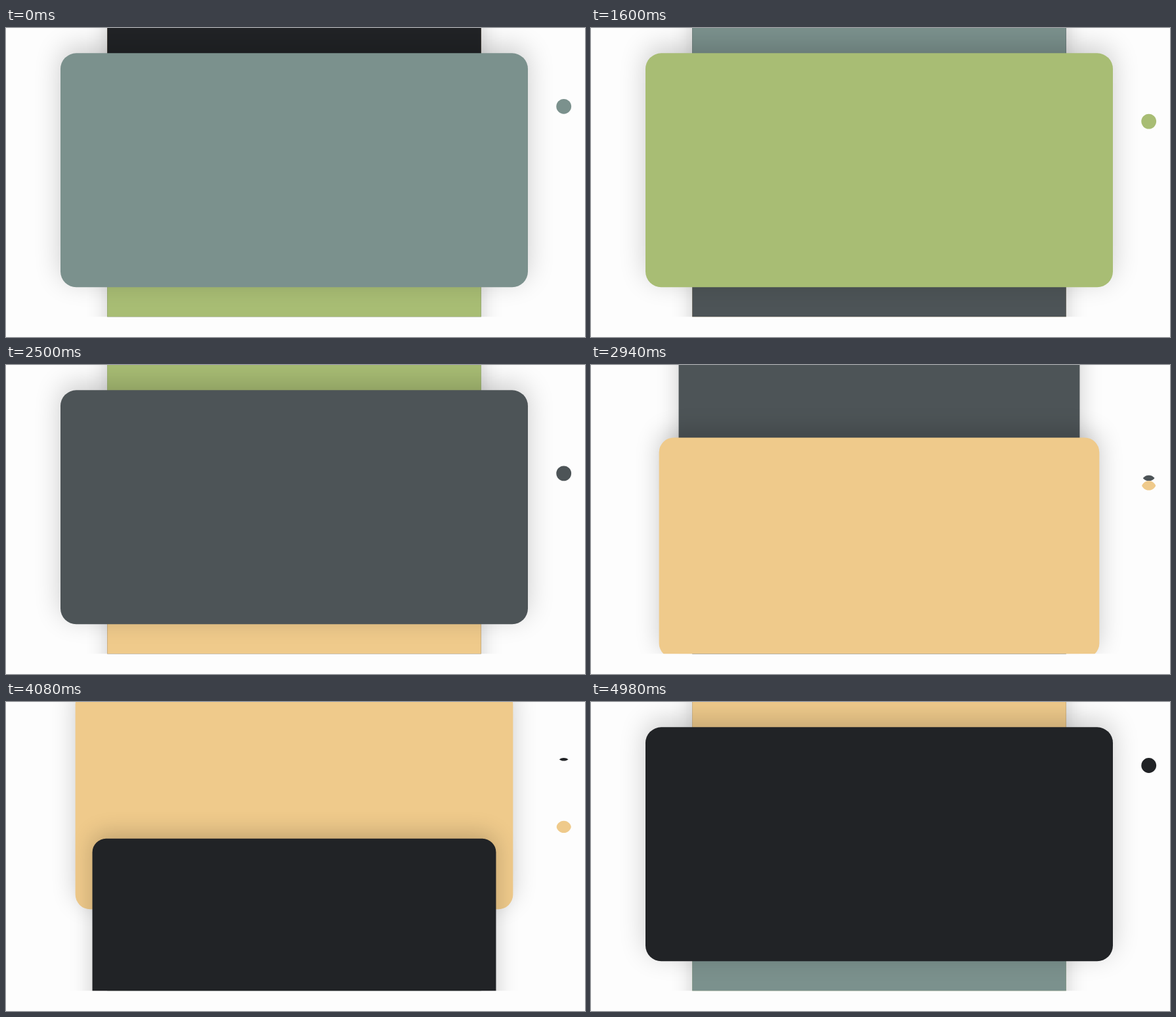
Write an HTML page with a canvas that moves like this. It is 882x470 px and loops after 5000 ms.

```html
<!DOCTYPE html>
<html lang="en">
<head>
<meta charset="utf-8">
<title>Vertical card carousel</title>
<style>
  html, body { margin: 0; width: 100%; height: 100%; overflow: hidden; background: #fdfdfd; }
  canvas { display: block; }
</style>
</head>
<body>
<canvas id="stage" width="882" height="470"></canvas>
<script>
const ctx = document.getElementById('stage').getContext('2d');
const LOOP = 5000;
const DURATION = 300;
const DOT_DELAY = 17;
const STARTS = [410, 1613, 2815, 4018];
const COLORS = ['#212326', '#7b918d', '#a8bd74', '#4d5457', '#efca8b'];
const COUNT = COLORS.length;

const card = { x: 439, y: 216.3, w: 712, h: 356, r: 24, gap: 213, side: 0.8 };
const dot = { x: 849.7, y: 96.5, r: 11.4, gap: 22.8 };
const clipBottom = 439.3;

const clamp = (v, lo, hi) => Math.min(hi, Math.max(lo, v));

// cubic-bezier(.25, .1, .25, 1)
function ease(x) {
  if (x <= 0) return 0;
  if (x >= 1) return 1;
  let lo = 0, hi = 1;
  for (let i = 0; i < 24; i++) {
    const m = (lo + hi) / 2;
    if (0.75 * m * (1 - m) + m ** 3 < x) lo = m; else hi = m;
  }
  return 0.3 * lo * (1 - lo) ** 2 + 3 * lo * lo * (1 - lo) + lo ** 3;
}

// Continuous index of the active slide
function position(t) {
  return STARTS.reduce((sum, s) => sum + ease((t - s) / DURATION), 1);
}

// Signed distance around the ring, in -2.5 .. 2.5
function distance(i, pos) {
  const d = i - pos + COUNT / 2;
  return d - Math.floor(d / COUNT) * COUNT - COUNT / 2;
}

function drawCard(i, d) {
  const off = clamp(d, -1, 1);
  const scale = 1 - (1 - card.side) * Math.abs(off);
  const w = card.w * scale, h = card.h * scale;
  const shade = 0.2 * clamp(2 - Math.abs(d), 0, 1);
  ctx.save();
  ctx.shadowColor = `rgba(0,0,0,${shade})`;
  ctx.shadowBlur = 40 * scale;
  ctx.shadowOffsetY = -9 * scale;
  ctx.fillStyle = COLORS[i];
  ctx.beginPath();
  ctx.roundRect(card.x - w / 2, card.y + card.gap * off - h / 2, w, h, card.r * scale);
  ctx.fill();
  ctx.restore();
}

function circle(x, y, r) {
  ctx.beginPath();
  ctx.arc(x, y, r, 0, Math.PI * 2);
}

// A disc slides through a round window
function drawDot(i, d) {
  if (Math.abs(d) >= 1) return;
  const y = dot.y + i * dot.gap;
  ctx.save();
  if (d !== 0) {
    circle(dot.x, y, dot.r);
    ctx.clip();
  }
  ctx.fillStyle = COLORS[i];
  circle(dot.x, y - d * dot.r * 2, dot.r);
  ctx.fill();
  ctx.restore();
}

function draw(t) {
  ctx.fillStyle = '#fdfdfd';
  ctx.fillRect(0, 0, 882, 470);

  const pos = position(t);
  const front = 1 + STARTS.filter(s => t >= s).length;
  const slides = COLORS.map((_, i) => ({ i, d: distance(i, pos) }));
  const depth = s => s.i === front % COUNT ? -1 : Math.abs(s.d);
  slides.sort((a, b) => depth(b) - depth(a));

  ctx.save();
  ctx.beginPath();
  ctx.rect(0, 0, 882, clipBottom);
  ctx.clip();
  for (const s of slides) drawCard(s.i, s.d);
  ctx.restore();

  const dotPos = position(t - DOT_DELAY);
  COLORS.forEach((_, i) => drawDot(i, distance(i, dotPos)));
}

const begin = performance.now();
function tick() {
  draw((performance.now() - begin) % LOOP);
  requestAnimationFrame(tick);
}
tick();
</script>
</body>
</html>
```
